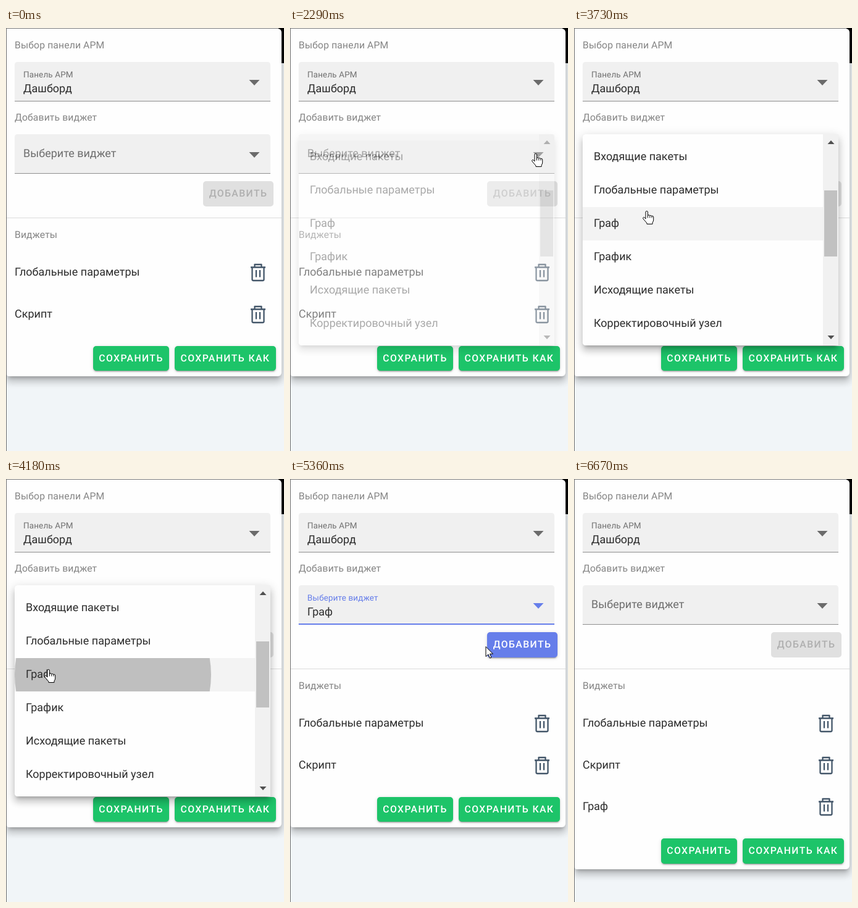
Write an HTML page that moves like this. It is 450 by 685 pixels and loops after 8010 ms.

```html
<!DOCTYPE html>
<html lang="ru">
<head>
<meta charset="utf-8">
<title>Панель виджетов</title>
<style>
html, body { margin: 0; width: 100%; height: 100%; overflow: hidden; background: #f1f5f8; }
body { font-family: Roboto, "Noto Sans", sans-serif; text-rendering: geometricPrecision; }
div, p, svg { position: absolute; margin: 0; box-sizing: border-box; }
p { white-space: pre; font-size: 18px; color: #2c2c2c; }
svg { overflow: visible; }
#stage { left: 0; top: 0; width: 450px; height: 685px; overflow: hidden; }
#panel { left: 1px; top: 1px; width: 445px; background: #fefefe; border-radius: 0 6px 6px 4px; }
#panel, #menu { box-shadow: 0 5.6px 5.6px -3.4px rgba(0,0,0,.2), 0 9px 11px 1px rgba(0,0,0,.14), 0 3.4px 16px 2px rgba(0,0,0,.12); }
.title { font-size: 15.75px; letter-spacing: .11px; color: #858585; }
.label { font-size: 13.5px; letter-spacing: .12px; color: #707070; }
.hint { color: #6e6e6e; }
.field { left: 14px; width: 414px; height: 64px; background: #f0f0f0; border-radius: 4.5px 4.5px 0 0; border-bottom: 1px solid #8e8e8e; }
.field.hover { background: #dfdfdf; border-color: #1d1d1d; }
.field.focus { border-bottom: 2px solid #667eea; }
.button { height: 40.5px; line-height: 40.5px; border-radius: 5px; text-align: center; color: #fff; font-weight: 500; font-size: 15.75px; letter-spacing: 1.41px; white-space: nowrap; background: #1dc469; box-shadow: 0 3px 1px -2px rgba(0,0,0,.2), 0 2px 2px rgba(0,0,0,.14), 0 1px 6px rgba(0,0,0,.12); }
.button.hover { box-shadow: 0 2px 4.5px -1px rgba(0,0,0,.2), 0 4.5px 6px rgba(0,0,0,.14), 0 1px 11px rgba(0,0,0,.12); }
.button.off { background: #e0e0e0; color: #afafaf; box-shadow: none; }
#menu { left: 14px; top: 172px; width: 414px; height: 342px; background: #fefefe; border-radius: 4.5px; }
.row { left: 0; width: 389px; height: 54px; overflow: hidden; }
.row.hover { background: #f3f3f3; }
#ripple { border-radius: 50%; background: #bfbfbf; }
</style>
</head>
<body>
<div id="stage"></div>
<script>
const LOOP = 8010;
const BLUE = '#667eea';
const ITEMS = ['Входящие пакеты', 'Глобальные параметры', 'Граф', 'График', 'Исходящие пакеты', 'Корректировочный узел'];

const box = (x, y, w, h, style = '') =>
  `<div style="left:${x}px;top:${y}px;width:${w}px;height:${h}px;${style}"></div>`;

// y is the baseline; the font's ascent is 0.927 em
const text = (x, y, str, cls = '', id = '') => {
  const size = { title: 15.75, label: 13.5 }[cls] || 18;
  return `<p id="${id}" class="${cls}" style="left:${x}px;top:${y - Math.round(size * .927)}px">${str}</p>`;
};

const svg = (x, y, body, id = '') =>
  `<svg id="${id}" width="1" height="1" style="left:${x}px;top:${y}px">${body}</svg>`;

const triangle = (x, y, w, h, fill, id) => svg(x, y, `<path d="M${-w / 2} 0H${w / 2}L0 ${h}Z" fill="${fill}"/>`, id);

const button = (x, y, w, str, id = '') =>
  `<div id="${id}" class="button" style="left:${x}px;top:${y}px;width:${w}px">${str}</div>`;

const widget = (y, str) => text(14, y, str) + svg(408, y - 6,
  `<path d="M-12 -8.5H12M-5.5 -9V-13H5.5V-9M-9.5 -8V11Q-9.5 13 -7.5 13H7.5Q9.5 13 9.5 11V-8M-3 -4V7.5M3 -4V7.5"
    fill="none" stroke="#435669" stroke-width="2.3" stroke-linejoin="round"/>`);

const menuRow = (str, i) =>
  `<div class="row" style="top:${10 + i * 54}px">${i === 2 ? '<div id="ripple"></div>' : ''}${text(18, 33, str)}</div>`;

const HAND = `<path transform="translate(-1)" d="M-3 13V2Q-3 .5 -1.3 .5T.4 2V8Q.6 6.8 2 6.8T3.8 8.3Q4 7.5 5.2 7.5T7 9Q7.2 8.3 8.2 8.3T9.7 10V15Q9.7 17 8 19V21.5H-1V20L-7 13Q-8 11 -6.5 10.5T-3 13Z
  M.4 8V11.5M3.8 8.5V11.5M7 9V11.5" fill="#fff" stroke="#000"/>`;
const ARROW = '<path d="M0 .5V16.5L4 13L6.5 19L9 18L6.5 12.2H11.5Z" fill="#fff" stroke="#000"/>';

document.getElementById('stage').innerHTML =
  box(436, 0, 14, 57, 'background:#000') +
  '<div id="panel"></div>' +
  box(0, 0, 1, 685, 'background:#6c6c6c') +
  box(0, 0, 441, 1, 'background:#7a7a7a') +
  text(14, 33, 'Выбор панели АРМ', 'title') +
  '<div class="field" style="top:55px"></div>' +
  text(28, 81, 'Панель АРМ', 'label') +
  text(28, 105, 'Дашборд') +
  triangle(401.5, 84, 17, 9, '#6b6b6b') +
  text(14, 150, 'Добавить виджет', 'title') +
  '<div id="field" style="top:172px"></div>' +
  text(28, 210, 'Выберите виджет', 'hint', 'hint') +
  text(28, 198, 'Выберите виджет', 'label', 'label') +
  text(28, 222, 'Граф', '', 'value') +
  triangle(401.5, 201, 17, 9, 'currentColor', 'caret') +
  button(319, 248.3, 114, 'ДОБАВИТЬ', 'add') +
  box(1, 307, 445, 1, 'background:#dcdcdc') +
  text(14, 340, 'Виджеты', 'title') +
  widget(402, 'Глобальные параметры') +
  widget(470, 'Скрипт') +
  `<div id="added">${widget(537, 'Граф')}</div>` +
  `<div id="footer">${button(141, 514.6, 123, 'СОХРАНИТЬ')}${button(273, 514.6, 164, 'СОХРАНИТЬ КАК')}</div>` +
  `<div id="menu">${ITEMS.map(menuRow).join('')}` +
    box(389, 0, 25, 342, 'background:#f1f1f1') +
    box(391, 91, 21, 107, 'background:#c1c1c1') +
    triangle(401.5, 16, 11, -6, '#505050') +
    triangle(401.5, 326, 11, 6, '#505050') +
  '</div>' +
  svg(0, 0, `<g id="hand">${HAND}</g><g id="arrow">${ARROW}</g>`, 'cursor');

const $ = id => document.getElementById(id);
const show = (id, on) => { $(id).style.display = on ? '' : 'none'; };
const rows = [...document.querySelectorAll('.row')];
$('label').style.color = BLUE;

// The picture advances in bursts: start, end, number of steps
const BURSTS = [[590, 1590, 8], [1720, 1860, 2], [2290, 2570, 3], [3030, 3880, 7],
  [4180, 5080, 7], [5230, 5510, 3], [5940, 6670, 6]];

function snap(t) {
  const burst = BURSTS.filter(b => b[0] <= t).pop();
  if (!burst) return 0;
  const [start, end, count] = burst;
  const step = (end - start) / (count - 1);
  return start + Math.min(count - 1, Math.floor((t - start + 10) / step)) * step;
}

// Pointer path: time, x, y
const PATH = [[590, 262, 225], [1447, 345, 212], [1590, 392, 206], [1860, 400, 203], [2900, 400, 203],
  [3030, 366, 233], [3880, 71, 308], [4480, 71, 308], [5080, 217, 276], [5510, 366, 269], [6670, 366, 269]];

function pointer(t) {
  const next = Math.max(1, PATH.findIndex(p => p[0] >= t));
  const [t0, x0, y0] = PATH[next - 1], [t1, x1, y1] = PATH[next];
  const k = Math.min(1, Math.max(0, (t - t0) / (t1 - t0)));
  return [x0 + (x1 - x0) * k, y0 + (y1 - y0) * k];
}

function addColor(t) {
  if (t < 5500) return BLUE;
  if (t < 5940) return '#7288eb';
  if (t < 6080) return '#8a9bef';
  return t < 6230 ? '#a6b2f3' : '#8d9ef0';
}

function draw(time) {
  const t = snap(time);
  const [x, y] = pointer(t);
  const selected = t >= 4470 && t < 6370;
  const done = t >= 6370;

  $('field').className = 'field' + (selected ? ' focus' : t >= 590 && t < 2290 ? ' hover' : '');
  show('hint', !selected);
  show('label', selected);
  show('value', selected);
  $('caret').style.color = selected ? BLUE : '#6b6b6b';

  const add = $('add');
  add.className = 'button' + (!selected ? ' off' : t >= 5500 ? ' hover' : '');
  add.style.background = selected ? addColor(t) : '';

  $('panel').style.height = (done ? 631 : 563) + 'px';
  $('footer').style.top = (done ? 67.5 : 0) + 'px';
  show('added', done);

  const open = t >= 2290 && t < 4470;
  show('menu', open);
  $('menu').style.opacity = Math.min(1, .4 + (t - 2290) / 280 * .6);
  const hovered = Math.floor((y - 182) / 54);
  rows.forEach((row, i) => row.classList.toggle('hover', open && i === hovered));
  show('ripple', t >= 4180);
  const radius = t < 4300 ? 159 : 230;
  const center = t < 4300 ? 158.5 : 195;
  Object.assign($('ripple').style, {
    left: center - radius + 'px', top: 27 - radius + 'px',
    width: 2 * radius + 'px', height: 2 * radius + 'px'
  });

  show('cursor', t >= 590 && t < 6660);
  const isHand = t < 4470 || (t >= 5500 && !done);
  show('hand', isHand);
  show('arrow', !isHand);
  $('cursor').style.left = Math.round(x) + 'px';
  $('cursor').style.top = Math.round(y) + 'px';
}

const begin = performance.now();
function tick() {
  draw((performance.now() - begin) % LOOP);
  requestAnimationFrame(tick);
}
tick();
</script>
</body>
</html>
```
